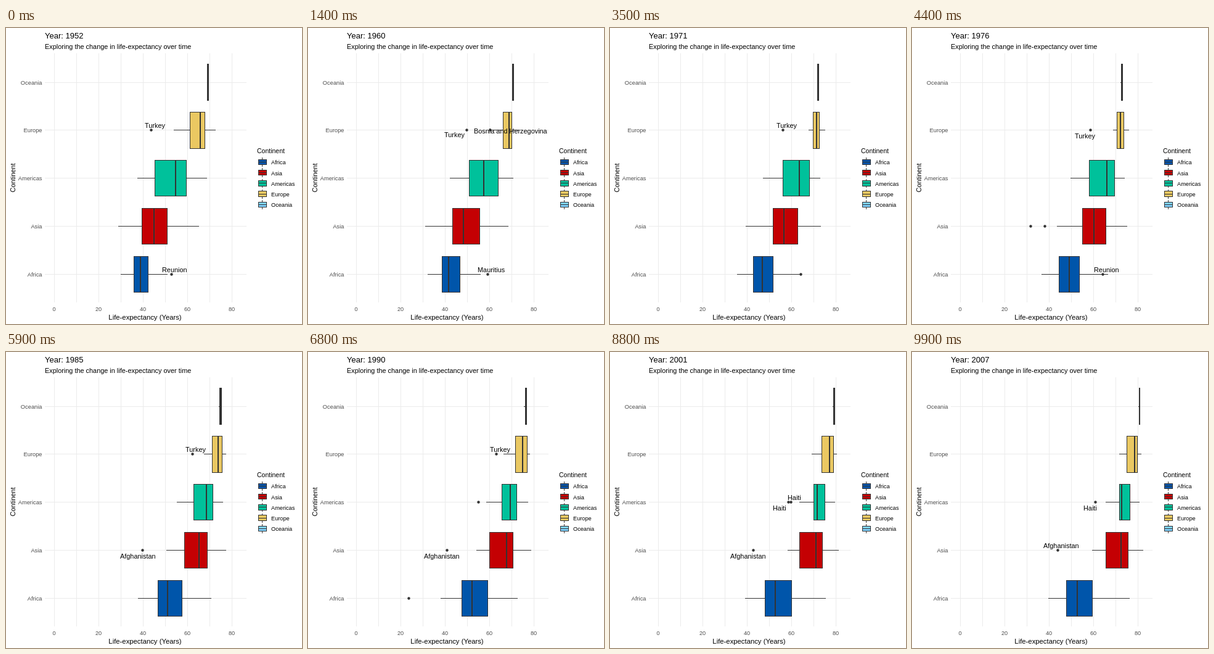
An HTML page with a canvas that plays this animation: 480 by 480 pixels, repeating every 10000 ms.

```html
<!DOCTYPE html>
<html lang="en">
<head>
<meta charset="utf-8">
<title>Life-expectancy by continent</title>
<style>
html, body { margin: 0; width: 100%; height: 100%; overflow: hidden; background: #fff; }
canvas { display: block; width: 480px; height: 480px; }
</style>
</head>
<body>
<canvas id="c" width="480" height="480"></canvas>
<script>
const ctx = document.getElementById('c').getContext('2d');
const FRAMES = 100, FRAME_MS = 100;
const STEP = 9, LAST = 11;       // a survey every 9 frames, numbered 0 to 11
const KEYS = [0, 2, 5, 8, LAST]; // surveys that have a key pose
const INK = '#333333', GRID = '#EBEBEB', GREY = '#4D4D4D';

const mix = (a, b, p) => a + (b - a) * p;
const px = v => 78 + 3.6 * v;
const pair = (lo, hi) => [0, 0.25, 0.5, 0.75, 1].map(f => mix(lo, hi, f));

// An outlying country from survey `from` to `to`; one side letter per survey
function track(name, from, to, v0, v1, sides, ease = 1) {
  const at = k => mix(v0, v1, to > from ? ((k - from) / (to - from)) ** ease : 0);
  return k => k >= from && k <= to
    ? { name, v: at(k), side: sides[(k - from) % sides.length] } : null;
}

// Poses: whisker start, lower quartile, median, upper quartile, whisker end
const rows = [
  { name: 'Africa', fill: '#0055AA', poses: [
    [30, 35.8, 38.8, 42.1, 51], [32.8, 39.5, 42.6, 47.8, 57.7],
    [36.8, 44.5, 49.3, 53.9, 67.1], [38.3, 48, 52.4, 59.9, 73.6],
    [39.6, 47.8, 52.9, 59.4, 76.4]
  ], tracks: [
    track('Reunion', 0, 0, 52.7, 52.7, 'U'), track('Mauritius', 1, 2, 58.1, 60.2, 'UD'),
    track('Reunion', 4, 4, 64.3, 64.3, 'U'), track('Rwanda', 8, 8, 23.6, 23.6, 'D')
  ] },
  { name: 'Asia', fill: '#C40003', poses: [
    [28.8, 39.4, 44.9, 50.9, 65.4], [32, 44.5, 49.3, 56.9, 69.4],
    [44.2, 55.5, 60.8, 65.9, 75.4], [55.6, 60.8, 68.7, 71.2, 79.4],
    [59.5, 65.5, 72.4, 75.6, 82.6]
  ], tracks: [
    track('Afghanistan', 5, 11, 38.4, 43.8, 'UD'), track('Cambodia', 5, 5, 31.2, 31.2, 'D')
  ].map((t, i) => i ? t : k => t(k) && { ...t(k), side: k % 5 && k < 10 ? 'D' : 'U' }) },
  { name: 'Americas', fill: '#00C19B', poses: [
    [37.6, 45.3, 54.7, 59.4, 68.8], [43.4, 52.3, 58.3, 65.1, 71.3],
    [49.9, 58.4, 66.4, 69.5, 74.2], [60, 66.8, 69.9, 72.8, 78],
    [65.6, 71.8, 72.9, 76.4, 80.7]
  ], tracks: [
    track('Bolivia', 9, 9, 62, 62, 'U'), track('Haiti', 8, 11, 55.1, 60.9, 'D')
  ] },
  { name: 'Europe', fill: '#EAC862', poses: [
    [53.8, 61.1, 65.9, 67.9, 72.7], [63.7, 67.3, 69.5, 70.5, 73.7],
    [68.9, 70.5, 72.3, 73.8, 76.1], [66.1, 71.8, 75.5, 77.3, 78.8],
    [71.8, 75, 78.6, 79.8, 81.8]
  ], tracks: [
    track('Bosnia and Herzegovina', 1, 2, 58.4, 61.9, 'R'),
    track('Turkey', 0, 7, 43.6, 63.1, 'UBLUDDUU', 0.75)
  ] },
  { name: 'Oceania', fill: '#7FD2FF', poses: [
    pair(69.1, 69.4), pair(70.9, 71.2), pair(72.2, 73.5), pair(76.3, 77.6), pair(80.2, 81.2)
  ], tracks: [] }
];
rows.forEach((r, i) => { r.mid = 399.2 - 77.8 * i; r.y = Math.floor(r.mid); });

// Label placement: alignment and offset from the point
const SIDES = {
  U: ['center', 6, -3], D: ['center', -8, 14],
  L: ['right', -4, 6], R: ['left', 3, 6], B: ['right', -4, 12]
};

// Smooth curve through the key poses
function curve(vals, k) {
  const n = KEYS.length - 1;
  const slope = i => {
    const a = Math.max(i - 1, 0), b = Math.min(i + 1, n);
    return (vals[b] - vals[a]) / (KEYS[b] - KEYS[a]);
  };
  let i = 0;
  while (i < n - 1 && k >= KEYS[i + 1]) i++;
  const h = KEYS[i + 1] - KEYS[i], u = (k - KEYS[i]) / h;
  const bend = u * (1 - u) * h;
  const chord = (vals[i + 1] - vals[i]) / h;
  return mix(vals[i], vals[i + 1], u) +
    bend * ((1 - u) * (slope(i) - chord) - u * (slope(i + 1) - chord));
}

function bar(x, y, w, h, color) {
  ctx.fillStyle = color;
  ctx.fillRect(x, y, w, h);
}

function setFont(size) {
  ctx.font = size + 'px "Liberation Sans", Arial, sans-serif';
}

function text(s, x, y, size, align = 'left', color = '#000') {
  setFont(size);
  ctx.textAlign = align;
  ctx.fillStyle = color;
  ctx.fillText(s, x, y);
}

// Outlined box; right and bottom pixels are included
function frameBox(left, top, right, bottom, fill) {
  bar(left, top, right - left + 1, bottom - top + 1, INK);
  bar(left + 1, top + 1, right - left - 1, bottom - top - 1, fill);
}

function drawLegend() {
  text('Continent', 407, 203, 10.5);
  rows.forEach((r, i) => {
    const c = 217.35 + 17.28 * i;
    const [tip, top, mid, bottom, foot] = [-6.9, -4.32, 0, 4.32, 6.9].map(d => Math.floor(c + d));
    bar(415, tip, 1, foot - tip + 1, INK);
    frameBox(409, top, 422, bottom, r.fill);
    bar(409, mid, 14, 1, INK);
    text(r.name, 430, Math.round(c) + 4, 9.2);
  });
}

function drawChrome(year) {
  bar(0, 0, 480, 480, '#fff');
  for (let v = 0; v <= 80; v += 10) bar(px(v), 41, 1, 404, GRID);
  for (const r of rows) {
    bar(63, r.y, 327, 1, GRID);
    text(r.name, 58.5, r.y + 4, 9.3, 'right', GREY);
  }
  for (let v = 0; v <= 80; v += 20) text(v, px(v), 459, 9.2, 'center', GREY);
  text('Year: ' + year, 63, 17, 13);
  text('Exploring the change in life-expectancy over time', 63, 34, 10.9);
  text('Life-expectancy (Years)', 225.5, 473, 11.3, 'center');
  ctx.save();
  ctx.translate(15, 243);
  ctx.rotate(-Math.PI / 2);
  text('Continent', 0, 0, 11, 'center');
  ctx.restore();
  drawLegend();
}

function drawBox(r, k, p) {
  const [lo, q1, mid, q3, hi] = r.poses[0].map((_, s) => {
    const vals = r.poses.map(pose => pose[s]);
    return Math.round(px(mix(curve(vals, k), curve(vals, Math.min(k + 1, LAST)), p)));
  });
  const top = Math.floor(r.mid - 29.2), bottom = Math.floor(r.mid + 29.2);
  bar(lo, r.y, hi - lo, 1, INK);
  frameBox(q1, top, q3, bottom, r.fill);
  bar(mid - 1, top, 2, bottom - top + 1, INK);
}

const mean = list => list.reduce((s, e) => s + e.v, 0) / list.length;

// A missing side of the pair collapses to the mean of the other
function drawDots(r, a, b, p) {
  const pick = (list, other, i) =>
    list.length ? list[Math.min(i, list.length - 1)].v : mean(other);
  for (let i = 0; i < Math.max(a.length, b.length); i++) {
    const x = px(mix(pick(a, b, i), pick(b, a, i), p));
    ctx.fillStyle = INK;
    ctx.beginPath();
    ctx.arc(Math.round(x) + 0.5, r.y + 0.5, 2.2, 0, 7);
    ctx.fill();
  }
}

function drawLabels(r, a, b, p) {
  setFont(10.9);
  a.forEach((e, i) => {
    const to = b[i] || e;
    const name = p < 0.5 ? e.name : to.name;
    const [align, dx, dy] = SIDES[e.side];
    const w = ctx.measureText(name).width;
    const shift = { left: 0, center: w / 2, right: w }[align];
    const x = Math.min(px(mix(e.v, to.v, p)) + dx - shift, 387.5 - w);
    text(name, Math.round(x), r.y + dy, 10.9);
  });
}

function draw(i) {
  const k = Math.floor(i / STEP), p = (i % STEP) / STEP;
  const at = (r, n) => r.tracks.map(t => t(n)).filter(Boolean);
  const span = r => [at(r, k), at(r, p ? k + 1 : k), p];
  drawChrome(Math.round(1952 + 55 * i / (FRAMES - 1)));
  for (const r of rows) {
    drawDots(r, ...span(r));
    drawBox(r, k, p);
  }
  for (const r of rows) drawLabels(r, ...span(r));
}

const start = performance.now();
function tick(now) {
  draw(Math.floor(Math.max(0, now - start) / FRAME_MS) % FRAMES);
  requestAnimationFrame(tick);
}
draw(0);
requestAnimationFrame(tick);
</script>
</body>
</html>
```
